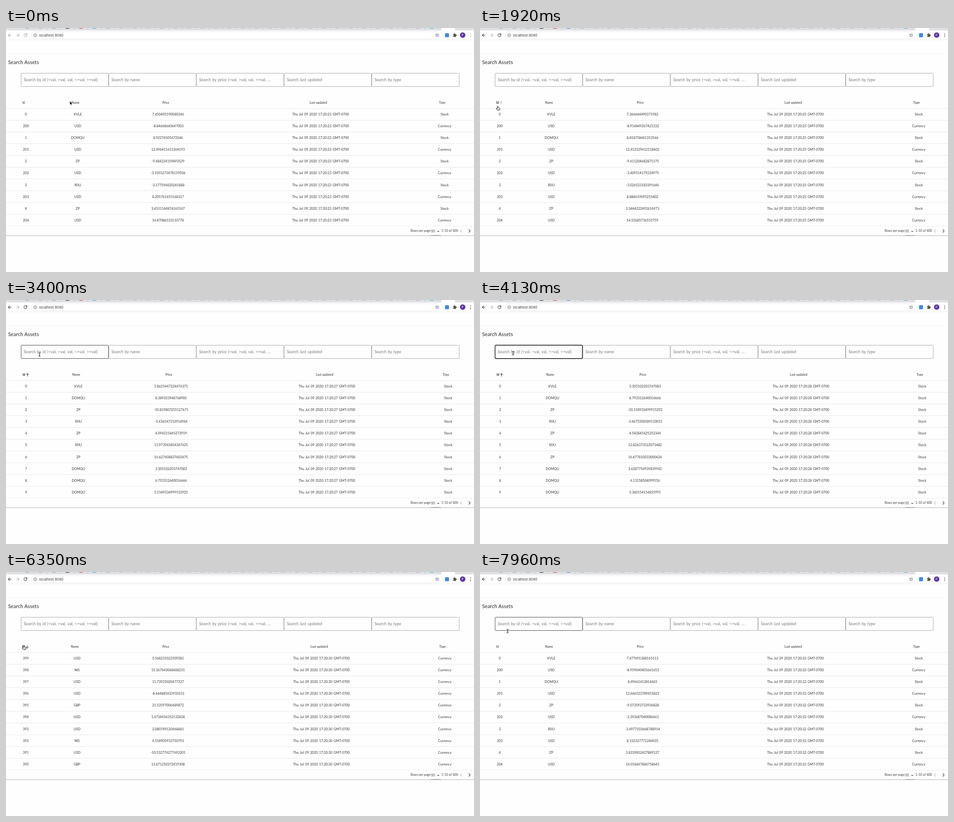
An HTML page that plays this animation: 1034x541 px, repeating every 8 s.

```html
<!DOCTYPE html>
<html lang="en">
<head>
<meta charset="utf-8">
<title>Search Assets</title>
<style>
  html, body { margin: 0; width: 100%; height: 100%; overflow: hidden; background: #fefefe; }
  svg { display: block; width: 1034px; height: 541px; }
  text { font-family: Lato, "Open Sans", sans-serif; fill: #333; white-space: pre; }
  .mid { text-anchor: middle; }
  .cell { font-size: 7.35px; word-spacing: .8px; }
  .head { font-size: 6.7px; font-weight: 700; fill: #5c5c5c; }
  .hint { font-size: 8.8px; letter-spacing: .06px; word-spacing: .7px; fill: #777; }
  .foot { font-size: 6.7px; letter-spacing: .08px; }
  .title { font-size: 11px; letter-spacing: .14px; fill: #222; }
  .url { font: 7.4px Inter, Roboto, sans-serif; letter-spacing: .12px; }
  .line { fill: none; stroke-linecap: round; stroke-linejoin: round; }
</style>
</head>
<body>
<svg viewBox="0 0 1034 541"><g id="static"></g><g id="live"></g></svg>
<script>
const DURATION = 8000, STEP = 147.6, LAST_STEP = 54;
const ACTIVATE = 8, SORT_UP = 16, FOCUS = 24, SORT_DOWN = 43, SORT_OFF = 49;
const ROWS = 10, ROW_HEIGHT = 26.05;
const FIELD = { x: 33.4, y: 100.3, w: 193.75, h: 29.4 };

const views = {
  none: {
    id: row => row % 2 * 200 + (row >> 1),
    names: 'KVLE USD DOMQU USD ZP USD RIXJ USD ZP USD',
    startPrices: [7, -8, 8, 12, -9, -3, -3, 8, 3, 14],
    columns: [43.7, 157.5, 359, 697, 969.5]
  },
  asc: {
    id: row => row,
    names: 'KVLE DOMQU ZP RIXJ ZP RIXJ ZP DOMQU DOMQU DOMQU',
    startPrices: [5, 8, -10, -3, 4, 13, 16, 3, 6, 5],
    columns: [44.5, 160, 364.7, 709, 977]
  },
  desc: {
    id: row => 399 - row,
    names: 'USD NIS USD USD GBP USD USD NIS USD GBP',
    startPrices: [5, 15, 11, -8, 21, 1, 2, 4, -10, 13],
    columns: [43.7, 157, 358, 697, 969.5]
  }
};

// step, x, y
const pointerPath = [
  [0, 141, 162], [3, 124, 135], [4, 124, 135], [6, 96, 109], [8, 72, 134], [13, 39, 173], [15, 39, 164],
  [19, 39, 165], [23, 74, 121], [25, 73, 118], [38, 73, 118], [43, 39, 163], [50, 39, 163], [54, 61, 131]
];

const escape = s => String(s).replace(/&/g, '&amp;').replace(/</g, '&lt;').replace(/>/g, '&gt;');
const text = (x, y, s, cls, extra = '') => `<text x="${x}" y="${y}" class="${cls}" ${extra}>${escape(s)}</text>`;
const rect = (x, y, w, h, fill, extra = '') => `<rect x="${x}" y="${y}" width="${w}" height="${h}" fill="${fill}" ${extra}/>`;
const stroke = (d, color, width = 1) => `<path class="line" d="${d}" stroke="${color}" stroke-width="${width}"/>`;
const circle = (x, y, r, fill, extra = '') => `<circle cx="${x}" cy="${y}" r="${r}" fill="${fill}" ${extra}/>`;
const at = (x, y, body, turn = 0) => `<g transform="translate(${x} ${y}) rotate(${turn})">${body}</g>`;
const random = seed => Math.abs(Math.sin(seed * 12.9898) * 43758.5453) % 1;

const field = (index, color, width) =>
  rect(FIELD.x + index * FIELD.w, FIELD.y, FIELD.w - .8, FIELD.h, 'none',
    `rx="1.8" stroke="${color}" stroke-width="${width}"`);

function drawTabs() {
  const colors = ['#7fb48d', '#aaa', '#7fb48d', '#111', '#d33', '#3c8fe0', '#8fb99a'];
  let out = rect(0, 0, 1034, 5.5, '#dfe1e5') + rect(962, 0, 30, 5.5, '#fff');
  for (let i = 0; i < 31; i++) {
    const x = 46.5 + i * 29.8;
    const color = i === 30 ? '#20bde8' : colors[i] || '#b4b7bc';
    out += rect(x - 4, 0, 8, 1.1, color) + rect(x + 14.5, 0, .7, 4, '#b5b8bd');
  }
  return out;
}

function drawToolbarBase() {
  const star = Array.from({ length: 10 }, (_, i) => {
    const a = i * Math.PI / 5, r = i % 2 ? 1.7 : 4;
    return `${(952.5 + r * Math.sin(a)).toFixed(1)},${(16 - r * Math.cos(a)).toFixed(1)}`;
  }).join(' ');
  return rect(0, 0, 1034, 26, '#fff') + drawTabs() + rect(0, 26, 1034, .7, '#e6e6e6')
    + rect(55.5, 8, 903, 16, 'none', 'rx="8" stroke="#e3e4e6" stroke-width=".8"')
    + circle(64.5, 16, 3.5, 'none', 'stroke="#555" stroke-width=".8"')
    + rect(64.1, 15.3, .9, 2.8, '#555') + rect(64.1, 13.8, .9, .9, '#555')
    + text(73, 18.6, 'localhost:8080', 'url')
    + `<polygon points="${star}" fill="none" stroke="#555" stroke-width=".8"/>`
    + rect(970, 11.6, 8.8, 8.8, '#3b86f0', 'rx="2"')
    + rect(988, 13.4, 6.4, 6.4, '#555', 'rx=".8"') + circle(991, 13.2, 1.4, '#555')
    + circle(994.4, 16.5, 1.4, '#555') + circle(988.2, 16.7, 1, '#fff')
    + circle(1009, 15.8, 6, '#5e35b1')
    + text(1009, 18.2, 'P', 'mid url', 'style="fill:#fff;font-size:6.5px"');
}

function drawFooter() {
  return rect(0, 460, 1034, .9, '#a6a6a6') + rect(939, 459.6, 22, .9, '#777')
    + text(894, 452.3, 'Rows per page:', 'foot') + text(939, 453, '10', 'cell')
    + '<path d="M952.3 450h5.4l-2.7 2.8z" fill="#666"/>'
    + text(962, 452.3, '1-10 of 400', 'foot', 'style="letter-spacing:.15px"')
    + stroke('M1006.4 446.8l-3 3.1 3 3.1', '#b5b5b5', 1.1)
    + stroke('M1022.6 446.8l3 3.1-3 3.1', '#444', 1.2);
}

function drawStatic() {
  const hints = ['Search by id (<val, >val, val, <=val, >=val)', 'Search by name',
    'Search by price (<val, >val, val, <=val, …', 'Search last updated', 'Search by type'];
  let out = drawToolbarBase() + rect(0, 57.5, 1034, .8, '#f1f1f1') + text(4.7, 79.6, 'Search Assets', 'title');
  hints.forEach((hint, i) => {
    out += field(i, '#a0a0a0', .9) + text(FIELD.x + i * FIELD.w + 5.8, 118, hint, 'hint');
  });
  for (let i = 0; i <= ROWS; i++) out += rect(0, 178.2 + i * ROW_HEIGHT, 1034, .7, '#dedede');
  return out + drawFooter();
}

function drawToolbar(active) {
  const color = active ? '#454545' : '#aaa';
  return stroke('M11.6 16H5M8.2 12.8L5 16l3.2 3.2', color, 1.1)
    + stroke('M22.4 16H29M25.8 12.8L29 16l-3.2 3.2', '#b5b5b5', 1.1)
    + stroke('M45.6 13.7A3.4 3.4 0 1 0 46.2 17M46.3 12.4v2.5h-2.5', color, 1.1)
    + [12.6, 15.8, 19].map(y => circle(1026.5, y, .9, color)).join('');
}

const secondAt = step => step < 7 ? 23 : 25 + Math.floor((step - 7) * 3 / 20);
const orderAt = step => step < SORT_UP || step >= SORT_OFF ? 'none' : step < SORT_DOWN ? 'asc' : 'desc';
const caretAt = step => Math.floor((step - 24.35) / 3.4) % 2 === 0;

function drawTable(step, hoverHead) {
  const order = orderAt(step), second = secondAt(step), view = views[order];
  const columns = second === 23 ? [44, 158.5, 358, 695, 969] : view.columns;
  const names = view.names.split(' ');
  const sorted = order !== 'none', marked = sorted || hoverHead;
  let out = ['Id', 'Name', 'Price', 'Last updated', 'Type'].map((label, i) =>
    text(columns[i] - 5, 167.9, label, 'mid head', i === 0 && marked ? 'style="fill:#222"' : '')).join('');
  if (marked) {
    const arrow = stroke('M0 3V-3M-2.8 -.3L0 -3.1L2.8 -.3', sorted ? '#222' : '#aaa');
    out += at(columns[0] + 3, 166, arrow, order === 'desc' ? 180 : 0);
  }
  for (let row = 0; row < ROWS; row++) {
    const id = view.id(row), start = view.startPrices[row];
    const price = start + Math.sign(start) * random(id + second * 7);
    const cells = [id, names[row], price, `Thu Jul 09 2020 17:20:${second} GMT-0700`, id < 200 ? 'Stock' : 'Currency'];
    cells.forEach((cell, i) => out += text(columns[i], (194.2 + row * ROW_HEIGHT).toFixed(1), cell, 'mid cell'));
  }
  return out;
}

function pointerAt(step) {
  const next = Math.max(1, pointerPath.findIndex(key => key[0] >= step));
  const [s0, x0, y0] = pointerPath[next - 1], [s1, x1, y1] = pointerPath[next];
  const p = (step - s0) / (s1 - s0);
  return [x0 + (x1 - x0) * p, y0 + (y1 - y0) * p];
}

const pointers = {
  arrow: '<path d="M0 0V8.4L2 6.6 3.4 9.6 4.7 9 3.4 6.1H6z" fill="#000" stroke="#fff" stroke-width=".6"/>',
  hand: '<path d="M-1 .7Q0-.6 1 .7V3.5L4 4Q5 4.4 4.9 5.5L4.2 9.2H-.8L-3.3 5.9Q-3.3 4.7-2.2 5.1L-1 6z" fill="#fff" stroke="#111" stroke-width=".9"/><path d="M1.2 6v2M2.7 6v2" stroke="#111" stroke-width=".5"/>',
  beam: stroke('M-2 -4.2Q0 -4.2 0 -3V3Q0 4.2 -2 4.2M2 -4.2Q0 -4.2 0 -3M0 3Q0 4.2 2 4.2M-1 1.5H1', '#222', .9)
};

function drawLive(step) {
  const [x, y] = pointerAt(step), active = step >= ACTIVATE;
  const hoverField = active && x > 33 && x < 227 && y >= 100 && y <= 131;
  const hoverHead = active && x < 50 && y > 160 && y < 178;
  const focused = step >= FOCUS && step < SORT_DOWN;
  let out = drawToolbar(active) + drawTable(step, hoverHead);
  if (focused) out += field(0, '#111', 1.4);
  else if (hoverField) out += field(0, '#484848', .8);
  if (focused && caretAt(step)) out += rect(39, 109.5, .8, 11, '#222');
  const shape = hoverField ? 'beam' : hoverHead ? 'hand' : 'arrow';
  return out + at(x, y, pointers[shape]);
}

const live = document.getElementById('live');
let shown = -1;
document.getElementById('static').innerHTML = drawStatic();

function frame() {
  const time = performance.now() % DURATION;
  const step = Math.min(LAST_STEP, Math.floor((time + 12) / STEP));
  if (step !== shown) live.innerHTML = drawLive(shown = step);
  requestAnimationFrame(frame);
}
frame();
</script>
</body>
</html>
```
